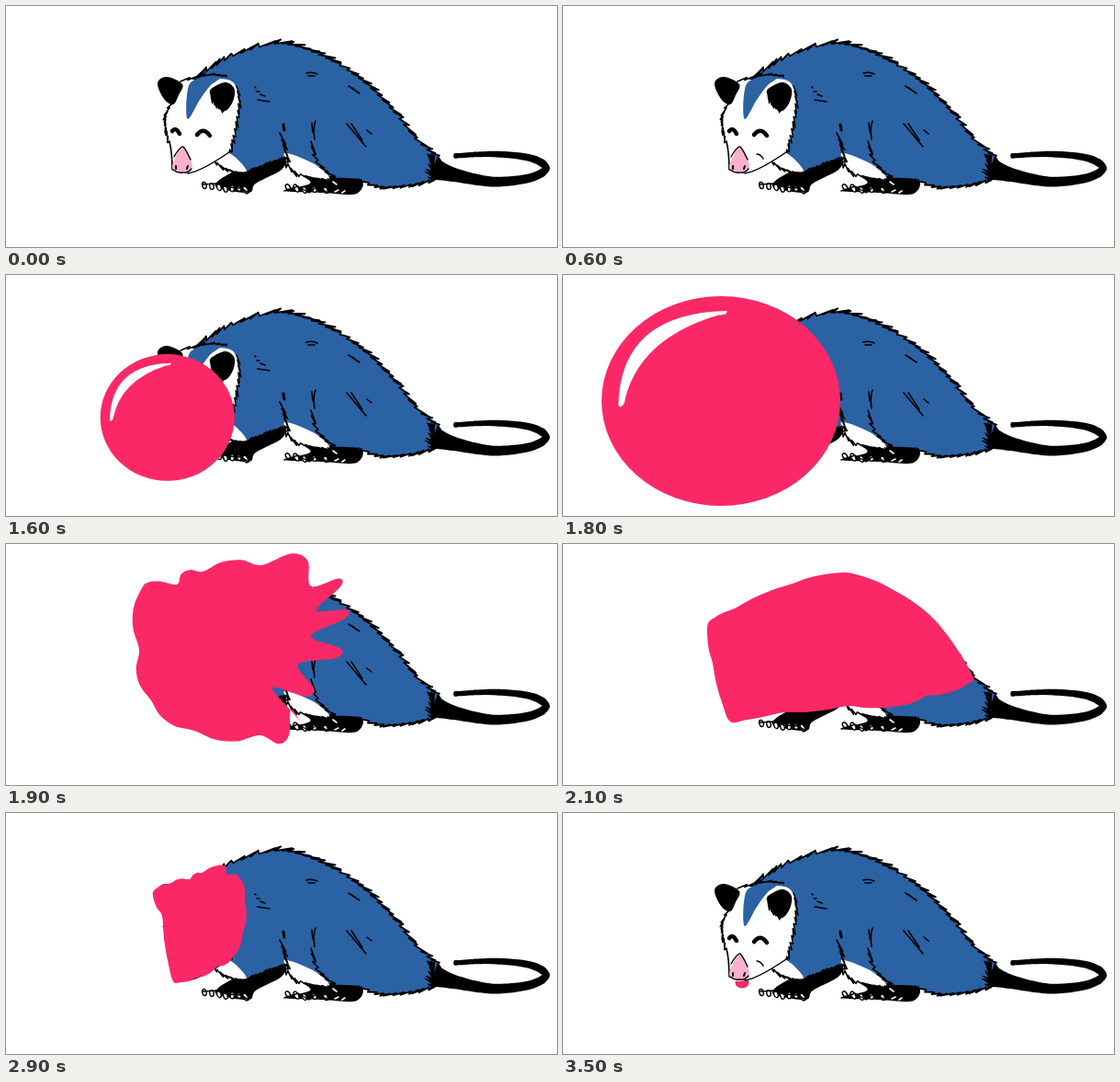
Write an HTML page that moves like this. It is 600 by 262 pixels and loops after 3.6 s.

```html
<!DOCTYPE html>
<html lang="en">
<head>
<meta charset="utf-8">
<title>Possum with bubble gum</title>
<style>
  html, body { margin: 0; width: 100%; height: 100%; overflow: hidden; background: #fff; }
  svg { display: block; width: 600px; height: 262px; }
</style>
</head>
<body>
<svg id="stage" viewBox="0 0 600 262" stroke-linecap="round" stroke-linejoin="round"></svg>
<script>
const BLUE = '#2b62a4', PINK = '#fb2867', NOSE = '#fbb0cb', INK = '#000', WHITE = '#fff';
const LOOP = 3600, STEP = 100;
const stage = document.getElementById('stage');

let seed = 11;
const rnd = () => (seed = (seed * 16807) % 2147483647) / 2147483647;
const vary = v => v * (0.7 + rnd() * 0.6);
const mix = (a, b, k) => a + (b - a) * k;
const mixPoint = (p, q, k) => [mix(p[0], q[0], k), mix(p[1], q[1], k)];

function points(text) {
  const n = text.split(' ').map(Number);
  return n.filter((_, i) => i % 2 === 0).map((x, i) => [x, n[2 * i + 1]]);
}

// Catmull-Rom spline through the points
function curve(p, closed = true) {
  const n = p.length;
  const at = i => closed ? p[(i + n) % n] : p[Math.max(0, Math.min(n - 1, i))];
  let d = `M${p[0]}`;
  for (let i = 0; i < (closed ? n : n - 1); i++) {
    const [a, b, c, e] = [at(i - 1), at(i), at(i + 1), at(i + 2)];
    d += `C${b[0] + (c[0] - a[0]) / 6} ${b[1] + (c[1] - a[1]) / 6} ` +
         `${c[0] - (e[0] - b[0]) / 6} ${c[1] - (e[1] - b[1]) / 6} ${c}`;
  }
  return closed ? d + 'Z' : d;
}

function add(tag, attrs, parent = stage) {
  const el = document.createElementNS('http://www.w3.org/2000/svg', tag);
  for (const k in attrs) el.setAttribute(k, attrs[k]);
  return parent.appendChild(el);
}
const path = (d, fill, stroke = 'none', width = 1.6, parent = stage) =>
  add('path', { d, fill, stroke, 'stroke-width': width }, parent);
const blob = (text, fill, stroke, width, parent) =>
  path(curve(points(text)), fill, stroke, width, parent);
const line = (d, width = 1.6, parent) => path(d, 'none', INK, width, parent);

// Calls visit(at, total); at(s, o) lies s along the line and o to its left
function along(text, visit) {
  const guide = path(curve(points(text), false), 'none');
  const total = guide.getTotalLength();
  const at = (s, o = 0) => {
    const p = guide.getPointAtLength(s);
    const a = guide.getPointAtLength(Math.max(0, s - 1)), b = guide.getPointAtLength(s + 1);
    const l = Math.hypot(b.x - a.x, b.y - a.y) || 1;
    return [p.x + (b.y - a.y) / l * o, p.y - (b.x - a.x) / l * o];
  };
  const result = visit(at, total);
  guide.remove();
  return result;
}

// Jagged tufts that follow a line and lean out to its left
function fur(text, len, out, fill = 'none', width = 1.6) {
  const d = along(text, (at, total) => {
    let d = `M${at(0)}`;
    for (let s = 0; s < total;) {
      const tip = at(Math.min(total, s + vary(len)), vary(out));
      s += vary(len * 0.62);
      d += `L${tip}L${at(Math.min(total, s))}`;
    }
    return d;
  });
  path(d, fill, INK, width);
}

function taper(text, width) {
  const N = 40;
  const edge = along(text, (at, total) => {
    const left = [], right = [];
    for (let i = 0; i <= N; i++) {
      const u = i / N, w = width(u) / 2;
      left.push(at(u * total, w));
      right.unshift(at(u * total, -w));
    }
    return left.concat(right);
  });
  path(curve(edge), INK);
}

function toes(x0, x1, y0, y1, count) {
  for (let i = 0; i < count; i++) {
    const k = i / (count - 1), x = mix(x0, x1, k), y = mix(y0, y1, k) + rnd() * 2 - 1;
    add('ellipse', { cx: x, cy: y, rx: vary(3.6), ry: 2.2, fill: WHITE, stroke: INK,
      'stroke-width': 1.4, transform: `rotate(${40 + 50 * rnd()} ${x} ${y})` });
  }
}

const BACK = '205 80 230 64 256 51 300 41 345 55 386 80 420 113 447 146 470 165';
const RUMP = '470 187 440 194 410 196 384 188';
const BELLY = '345 184 306 160 300 169 262 181 238 160 220 110';

function drawBody() {
  blob('328 183 384 186 382 204 345 203 304 201 331 193', INK);
  toes(307, 325, 198, 200, 3);
  toes(336, 348, 200, 201, 2);
  line('M303 201L318 196L330 203L338 197L351 203', 1.4);
  path('M356 191l4 3M358 202l4-2M366 203l3-2', 'none', WHITE);

  blob(`${BACK} ${RUMP} ${BELLY}`, BLUE);
  fur(BACK, 14, 3.6, BLUE, 1.8);
  fur(RUMP, 12, 2.6, BLUE, 1.8);
  fur('466 190 464 177 467 163', 6, 7, INK, 1);
  taper('466 177 490 184 530 191 570 187 588 176 570 165 530 161 488 163',
    u => 5 + 8 * (1 - u) + 12 * Math.exp(-14 * u));

  blob('305 160 336 172 352 188 323 183 307 172', WHITE);
  fur('304 166 312 178 330 186 353 188', 9, -3);
  fur('332 147 336 168 356 188', 12, 3);
  fur('298 138 302 152 306 170', 11, 3);
}

function drawFrontLeg() {
  blob('226 166 243 160 262 180 240 181', WHITE);
  blob('304 166 300 178 272 193 264 203 228 196 246 181 262 180 285 172', INK);
  fur('262 181 283 173 304 166', 8, 2, INK, 1.2);
  fur('226 167 238 176 258 182', 9, -2);
  toes(216, 232, 195, 198, 3);
  toes(239, 261, 198, 200, 4);
  line('M214 194L230 193L241 197L256 198L264 203', 1.6);
}

function drawMarks() {
  const marks = `M271 88l1 1M273 93h3M277 96l5 2M274 102l13 2M327 73q6-2 12 1M329 76h7
    M373 87l12 8M377 89l6 5M337 125q-3 8-1 20M333 127l1 10M371 128l21 25M376 128l12 18M393 135l5 4`;
  line(marks, 1.6);
  line('M302 129l1 6', 3);
}

function drawFace() {
  blob('187 84 215 80 246 82 253 105 249 132 243 158 220 173 200 182 181 179 177 150 174 125 181 105', WHITE);
  blob('204 81 232 78 222 87 211 102 198 123 197 97', BLUE);
  fur('190 82 205 79 220 75 240 77', 11, 2);
  fur('181 106 175 117 174 130 178 148', 8, -2, WHITE);
  line('M178 147Q181 160 181 178');
  fur('251 87 253 105 249 132 243 158', 10, 3, WHITE, 1.4);
  line('M198 182Q212 180 243 159', 1.5);
  blob('165 84 175 77 192 85 188 97 182 107 172 101', INK);
  blob('222 95 228 87 240 83 249 91 246 106 236 114', INK);
  fur('223 97 228 106 237 114', 7, -2, INK, 1.2);
  line('M181 136Q185 131 189 139M208 140Q215 131 222 141', 4.5);
}

function drawSnout(g) {
  blob('192 152 199 163 203 174 198 181 186 181 181 175 186 162', NOSE, 'none', 1, g);
  line('M183 164Q190 152 193 153Q196 156 201 167M182 178Q187 182 192 181Q198 182 202 177', 1.4, g);
  line('M185 174v3M198 174l-1 3', 2, g);
}

drawBody();
drawFrontLeg();
drawMarks();
const tongue = add('ellipse', { cx: 195, cy: 184.5, rx: 7.5, ry: 6, fill: PINK });
drawFace();
const snout = add('g', {});
drawSnout(snout);
const mouth = line('M211 161Q215 161 218 166', 1.5);
const bubble = add('g', {});
add('circle', { r: 1, fill: PINK }, bubble);
const shine = path('M-.86 .04Q-.84 -.84 .05 -.86Q.06 -.82 -.02 -.82Q-.7 -.59 -.81 .02Q-.84 .08 -.86 .04Z',
  WHITE, 'none', 0, bubble);
const gum = path('', PINK);

// Gum outlines share their order of points, so they blend; bump and reach shape the lobes
const sheet = (text, bump = 2.5, reach = 0) => ({ keys: points(text), bump, reach });
const SPLAT = sheet('148 48 186 44 214 30 278 23 332 46 338 72 332 100 318 131 290 156 310 180 277 208 205 203 158 170 145 115', 8, 29);
const DRAPE = sheet('158 86 187 70 250 43 308 31 360 50 408 86 447 146 425 160 395 165 365 176 310 176 240 183 182 193 163 130');
const CAPE = sheet('163 84 187 72 250 48 308 35 355 51 390 67 399 87 372 101 356 118 345 148 295 164 237 171 180 183 170 110');
const HOOD = sheet('160 86 180 76 200 72 213 65 237 57 240 67 255 71 260 95 258 130 247 157 230 167 208 179 182 183 170 112');

function blend(a, b, k) {
  return {
    keys: a.keys.map((p, i) => mixPoint(p, b.keys[i], k)),
    bump: mix(a.bump, b.bump, k),
    reach: mix(a.reach, b.reach, k)
  };
}

// A rounded lobe between each pair of points, pushed away from the middle
function lobed({ keys, bump, reach }) {
  const n = keys.length;
  const mid = [0, 1].map(j => keys.reduce((s, p) => s + p[j], 0) / n);
  return keys.flatMap((p, i) => {
    const q = keys[(i + 1) % n], [x, y] = mixPoint(p, q, 0.5);
    const dx = x - mid[0], dy = y - mid[1], l = Math.hypot(dx, dy);
    const push = (bump + reach * Math.max(0, dx / l)) / l;
    const tip = k => mixPoint(p, q, k).map((v, j) => v + push * [dx, dy][j]);
    return [p, tip(0.33), tip(0.67)];
  });
}

function gumAt(t) {
  if (t <= 2100) return blend(SPLAT, DRAPE, (t - 1900) / 200);
  if (t <= 2500) return DRAPE;
  if (t <= 2600) return CAPE;
  if (t <= 2900) return blend(CAPE, HOOD, (t - 2600) / 300);
  // sucked back into the mouth
  const k = (t - 2900) / 600;
  return { ...HOOD, keys: HOOD.keys.map(p => mixPoint(p, [198, 187], k)) };
}

function placeBubble(t) {
  const early = Math.min(1, (t - 700) / 500), late = Math.max(0, (t - 1200) / 600) ** 1.9;
  const r = 4 + 20 * early + 106 * late, rise = late ** 0.7;
  const x = 193 - 12 * early - 9 * rise, y = 182 - 2 * early - 43 * rise;
  bubble.setAttribute('transform', `translate(${x} ${y}) scale(${r} ${r * (1 - 0.124 * late)})`);
  shine.setAttribute('transform', `scale(${late ? 1 : 0.85})`);
}

const show = (el, on) => el.setAttribute('visibility', on ? 'visible' : 'hidden');
const shift = (el, y) => el.setAttribute('transform', `translate(0 ${y})`);

function draw(t) {
  const chew = t < 700 ? Math.sin(Math.PI * t / 200) : 0;
  const blowing = t >= 700 && t <= 1800, covered = t >= 1900 && t <= 3400;
  shift(snout, -chew);
  shift(mouth, 2 * chew);
  show(mouth, t > 0);
  show(tongue, t === 3500);
  show(bubble, blowing);
  show(gum, covered);
  if (blowing) placeBubble(t);
  if (covered) gum.setAttribute('d', curve(lobed(gumAt(t))));
}

let last = -1;
function tick() {
  const t = Math.floor(performance.now() % LOOP / STEP) * STEP;
  if (t !== last) draw(last = t);
  requestAnimationFrame(tick);
}
tick();
</script>
</body>
</html>
```
